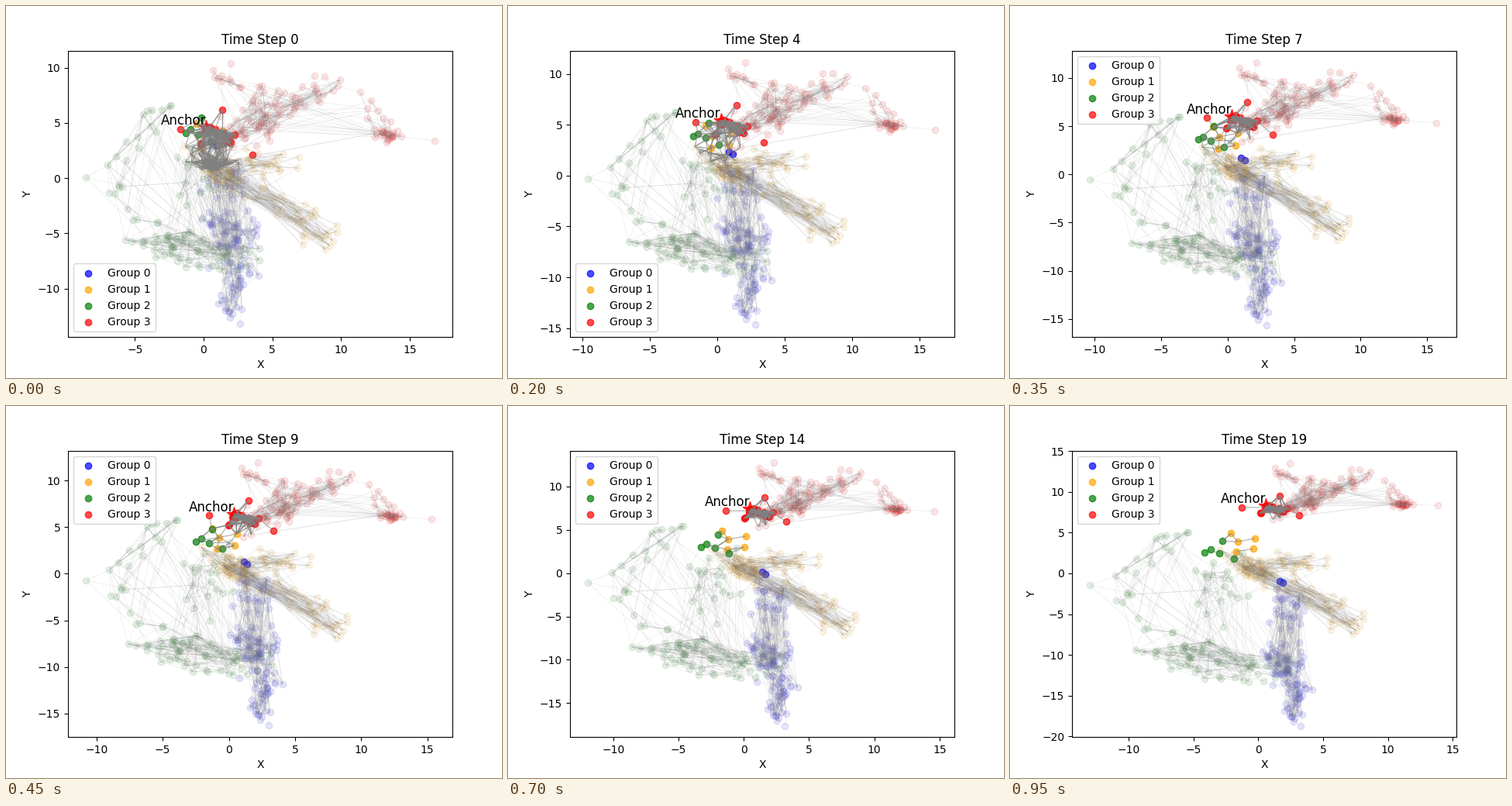
Animation of 640 by 480 pixels, one loop 1 s. Source, as a matplotlib script:

```python
import numpy as np
import matplotlib.pyplot as plt
from matplotlib.animation import FuncAnimation
from matplotlib.collections import LineCollection
from matplotlib.colors import to_rgb

STEPS = 20
COLORS = ["blue", "orange", "green", "red"]
BLUE, ORANGE, GREEN, RED = range(4)
rng = np.random.default_rng(11)

# group, node count, spread, then the path the nodes are scattered along
LIMBS = [
    (BLUE, 75, .9, (1.2, 1.5), (2, -5), (2.2, -7.5)),
    (BLUE, 34, .5, (2.6, -8), (1.8, -12.4)),
    (BLUE, 20, .4, (-.3, -3.9), (3.6, -4.9)),
    (ORANGE, 50, .6, (-1, 2.6), (1, .6), (2.2, 0)),
    (ORANGE, 55, .75, (1, .5), (7, -3.3), (8.7, -5.4)),
    (ORANGE, 28, .75, (2, 1), (6.3, 1.8)),
    (GREEN, 18, .8, (-.4, 3.5), (0, -4.5)),
    (GREEN, 70, .75, (-4.5, -5), (-1, -6.5), (3, -7.4)),
    (GREEN, 22, .6, (-3.2, 6.4), (-7.2, 0), (-4.7, -4)),
    (RED, 62, .95, (1.5, 3.2), (4, 5), (5, 7)),
    (RED, 24, .55, (5.5, 6.5), (9.8, 8.6)),
    (RED, 18, .25, (12.8, 4), (14.4, 4.1)),
    (RED, 9, .3, (0, 9.4), (2.8, 8.2)),
    (RED, 14, .55, (11.2, 7.6), (13.2, 5), (12.5, 2.3)),
]
EXTREMES = [(GREEN, (-8.55, .05)), (RED, (16.82, 3.37)), (RED, (2, 10.36)), (BLUE, (2.65, -13.2))]

# Nodes that stay opaque; the first red one is the anchor
BRIGHT = {
    RED: [(.17, 4.56), (-1.7, 4.42), (1.35, 6.18), (3.55, 2.1)],
    ORANGE: [(-.5, 4.9), (1.35, 4.28), (0, 3.9), (1.2, 3), (-.1, 2.7)],
    GREEN: [(-1.3, 4.1), (-.94, 4.4), (-.4, 3.95), (-.19, 5.45), (.53, 3.3)],
    BLUE: [(.65, 3.2), (.95, 2.97)],
}


def scatter_along(count, spread, *path):
    knots = np.arange(len(path))
    along = rng.uniform(0, knots[-1], count)
    spine = np.c_[[np.interp(along, knots, axis) for axis in zip(*path)]].T
    return spine + rng.normal(0, spread, (count, 2)).clip(-2 * spread, 2 * spread)


def travel(group, x, y):
    """Displacement over the whole loop and its easing strength."""
    low = np.minimum(y, 0)
    if group == BLUE:
        dip = np.exp(-((y + 5) / 3) ** 2)
        return 1.15 - .2 * x - .9 * dip, -4.4 + .09 * y - 1.4 * dip, np.where(y < -8, .3, 0)
    if group == ORANGE:
        return -1.6 + 0 * x, .15 * low, 0 * x
    if group == GREEN:
        inner = (x > -2) & (y > 2)
        return -2.55 + .22 * x, -1.5 + .42 * low, np.where(inner, -.2, .13)
    lift = 2.45 * np.exp(-(y / 3.8) ** 2)
    return .45 - .2 * np.maximum(x, 0) + .06 * (y - 4.5), 3.1 + lift + .045 * x, .1 + 0 * x


def ease(u, curve):
    return u + curve * u * (1 - u)


start, group_of = np.empty((0, 2)), np.empty(0, int)


def add_nodes(group, points):
    global start, group_of
    first = len(start)
    start = np.vstack([start, points])
    group_of = np.append(group_of, [group] * len(points))
    return np.arange(first, len(start))


limbs = [add_nodes(group, scatter_along(*shape)) for group, *shape in LIMBS]
for group, point in EXTREMES:
    add_nodes(group, [point])
faint = np.arange(len(start))
bright = {group: add_nodes(group, points) for group, points in BRIGHT.items()}
anchor = bright[RED][0]
crowd = scatter_along(17, .35, (-.4, 2.8), (.5, 4.2), (2.3, 3.3))
bright[RED] = np.append(bright[RED], add_nodes(RED, crowd))

shift, bend = np.zeros_like(start), np.zeros((len(start), 1))
for group in range(4):
    pick = group_of == group
    dx, dy, bend[pick, 0] = travel(group, *start[pick].T)
    shift[pick] = np.c_[dx, dy]


def distance(points, other):
    return np.hypot(*np.moveaxis(points - other, -1, 0))


def random_edges(nodes, count):
    """Pairs of nodes, skewed so that some nodes become hubs."""
    hubs = nodes[(rng.random(count) ** 2 * len(nodes)).astype(int)]
    return np.c_[hubs, rng.choice(nodes, count)]


faint_edges = [random_edges(limb, 2 * len(limb)) for limb in limbs]
faint_edges += [random_edges(faint[group_of[faint] == g], 90) for g in range(4)]
end = start + shift
for node in faint:
    near = np.argsort(distance(end, end[node]))[1:8]
    faint_edges.append(np.c_[[node], rng.choice(near, 1)])
faint_edges = np.concatenate(faint_edges)

core = np.flatnonzero(distance(start, (.6, 2.7)) < 2.3)
core_edges = rng.choice(core, (800, 2))
linked = np.concatenate([bright[g] for g in (RED, ORANGE, GREEN)])
bright_edges = rng.choice(linked, (260, 2))

fig, ax = plt.subplots(figsize=(6.4, 4.8), dpi=100)


def draw_lines(pos, edges, width, alpha):
    ax.add_collection(LineCollection(pos[edges], colors="gray", linewidths=width,
                                     alpha=alpha, zorder=2), autolim=False)


def padded(low, high):
    pad = .05 * (high - low)
    return low - pad, high + pad


def draw(step):
    ax.clear()
    u = step / (STEPS - 1)
    pos = start + shift * ease(u, bend)

    for group, color in enumerate(COLORS):
        pale = faint[group_of[faint] == group]
        muted = .75 * np.array(to_rgb(color)) + .08
        ax.scatter(*pos[pale].T, color=[muted], alpha=.11)
        ax.scatter(*pos[bright[group]].T, color=color, alpha=.7)
        ax.scatter([], [], color=color, alpha=.7, label=f"Group {group}")
    ax.scatter(*pos[anchor], color="red", marker="*", s=200, alpha=.8)

    draw_lines(pos, faint_edges, .5, .17)
    for edges, max_length, max_reach in [(core_edges, 2, 4.1), (bright_edges, 1.9, 9)]:
        length = distance(pos[edges[:, 0]], pos[edges[:, 1]])
        reach = distance(pos[edges], pos[anchor]).max(axis=1)
        draw_lines(pos, edges[(length < max_length) & (reach < max_reach)], .8, .65)
    ax.text(*pos[anchor], "Anchor", fontsize=12, ha="right", va="bottom", zorder=3)

    ax.set_xlim(padded(-8.59 - 4.44 * ease(u, .13), 16.82 - 2.89 * ease(u, -.18)))
    ax.set_ylim(padded(-13.22 - 5.28 * ease(u, .3), 10.36 + 3.11 * ease(u, -.03)))
    ax.set_title(f"Time Step {step}")
    ax.set_xlabel("X")
    ax.set_ylabel("Y")
    ax.legend(loc="lower left" if step < 7 else "upper left")
    return []


anim = FuncAnimation(fig, draw, frames=STEPS, interval=50, init_func=lambda: [],
                     repeat=True, repeat_delay=0)
plt.show()
```
